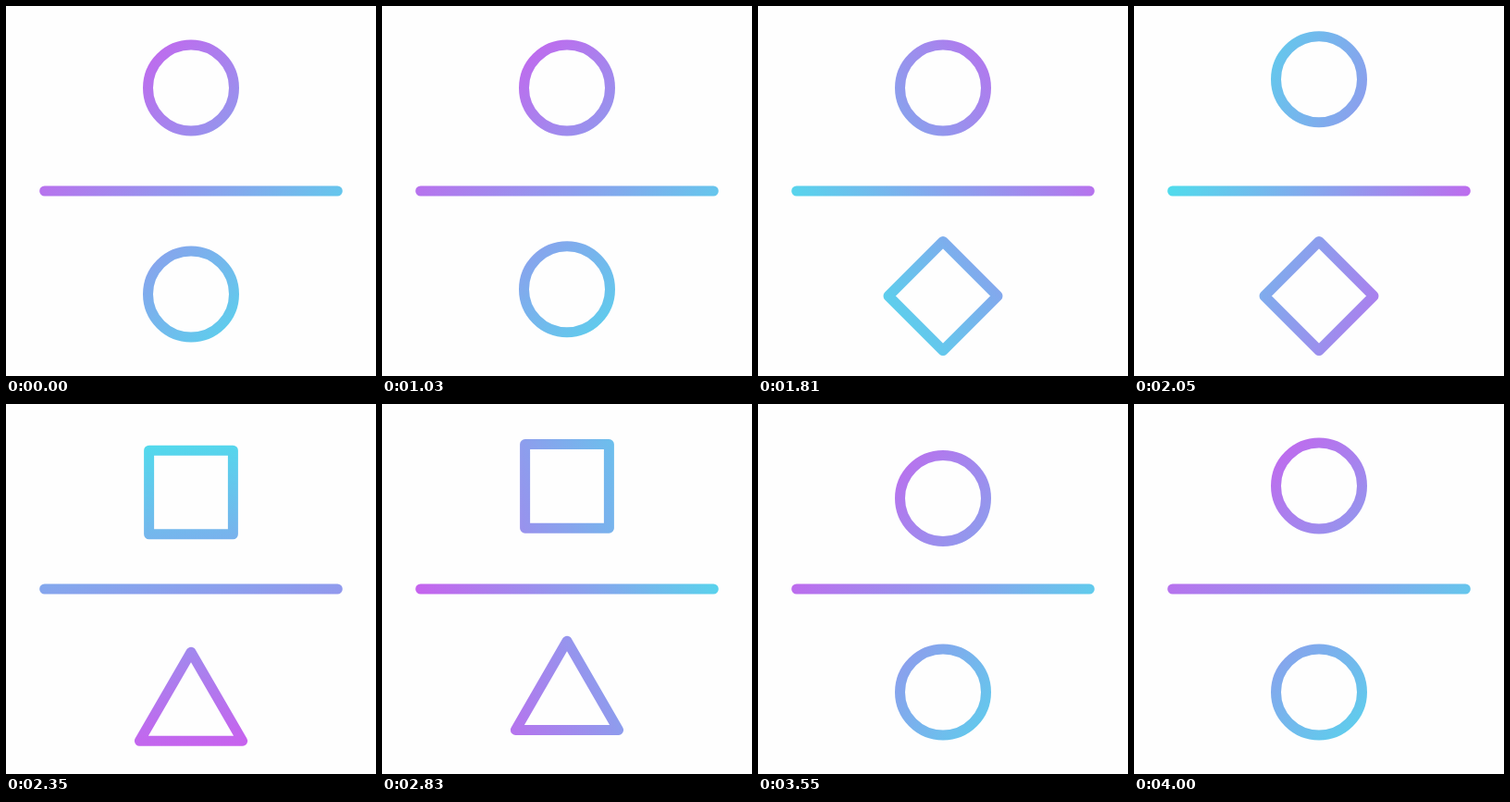
An HTML page with a canvas that plays this animation: 400x400 px, repeating every 4.03 s.

```html
<!DOCTYPE html>
<html lang="en">
<head>
<meta charset="utf-8">
<title>Divide</title>
<style>
html, body { margin: 0; width: 100%; height: 100%; overflow: hidden; background: #fefefe; }
canvas { display: block; width: 400px; height: 400px; }
</style>
</head>
<body>
<canvas id="stage"></canvas>
<script>
const LOOP = 4030, HOLD = 1030, STEP = 30;
const canvas = document.getElementById('stage');
const ctx = canvas.getContext('2d');
const dpr = window.devicePixelRatio || 1;
canvas.width = canvas.height = 400 * dpr;
ctx.scale(dpr, dpr);
ctx.lineWidth = 11;
ctx.lineCap = ctx.lineJoin = 'round';

const swing = p => (1 - Math.cos(Math.PI * p)) / 2;
const out = p => Math.sin(Math.PI / 2 * p);
const fall = p => p * p;

// cubic-bezier(.3, 0, .4, 1)
function spin(x) {
  let lo = 0, hi = 1;
  for (let i = 0; i < 24; i++) {
    const s = (lo + hi) / 2, r = 1 - s;
    if (.9 * s * r * r + 1.2 * s * s * r + s * s * s < x) lo = s; else hi = s;
  }
  return lo * lo * (3 - 2 * lo);
}

// keys: [time, value, easing into this key]
function track(t, keys) {
  if (t <= keys[0][0]) return keys[0][1];
  for (let i = 1; i < keys.length; i++) {
    const [t1, v1, ease] = keys[i], [t0, v0] = keys[i - 1];
    if (t < t1) return v0 + (v1 - v0) * ease((t - t0) / (t1 - t0));
  }
  return keys[keys.length - 1][1];
}

// gap: distance from the resting outline to the line
const circle = y => ({ gap: 54, draw: dy => ctx.arc(200, y + dy, 46.5, 0, 2 * Math.PI) });
const poly = (gap, pts) => ({ gap, draw(dy) {
  pts.forEach(([x, y]) => ctx.lineTo(x, y + dy));
  ctx.closePath();
} });

const topCircle = circle(88.5), lowCircle = circle(311.5);
const square = poly(54, [[154.6, 43.6], [245.4, 43.6], [245.4, 134.2], [154.6, 134.2]]);
const diamond = poly(43.5, [[200, 254.5], [259, 313.5], [200, 372.5], [141, 313.5]]);
const triangle = poly(45, [[200, 256.3], [255.6, 352.4], [144.4, 352.4]]);

const LOW_HIT = 150, TOP_HIT = 245;
const lowHop = (t, gap) => track(t, [[0, 0], [LOW_HIT, -gap, swing], [335, 14.5, out],
  [470, -4, swing], [600, 0, swing]]);
const topHop = (t, gap) => track(t, [[0, 0], [130, -9.3, swing], [TOP_HIT, gap, fall],
  [540, -4, out], [740, 0, swing]]);

const lowHops = [[1000, lowCircle, diamond], [2050, diamond, triangle], [2840, triangle, lowCircle]];
const topHops = [[1925, topCircle, square], [3160, square, topCircle]];

function stroke(path) {
  ctx.beginPath();
  path();
  ctx.stroke();
}

function drawHopper(t, hops, hop, hit) {
  const [start, before, after] = hops.filter(h => h[0] <= t).pop() || hops[0];
  const u = t - start, shape = u < hit ? before : after;
  stroke(() => shape.draw(hop(u, shape.gap)));
}

function paint(t) {
  const turn = spin(Math.min(1, Math.max(0, (t - 1000) / 3000)));
  const a = Math.PI / 4 + 2 * Math.PI * turn;
  const dx = 182 * Math.cos(a), dy = 182 * Math.sin(a);
  const fill = ctx.createLinearGradient(214 - dx, 200 - dy, 214 + dx, 200 + dy);
  fill.addColorStop(0, '#cb5eee');
  fill.addColorStop(1, '#4be1ec');
  ctx.fillStyle = '#fefefe';
  ctx.fillRect(0, 0, 400, 400);
  ctx.strokeStyle = fill;
  stroke(() => { ctx.moveTo(41.7, 200); ctx.lineTo(358.3, 200); });
  drawHopper(t, topHops, topHop, TOP_HIT);
  drawHopper(t, lowHops, lowHop, LOW_HIT);
}

const origin = performance.now();
function tick() {
  const t = (performance.now() - origin) % LOOP;
  paint(t < HOLD ? 0 : HOLD + Math.floor((t - HOLD) / STEP) * STEP);
  requestAnimationFrame(tick);
}
tick();
</script>
</body>
</html>
```
